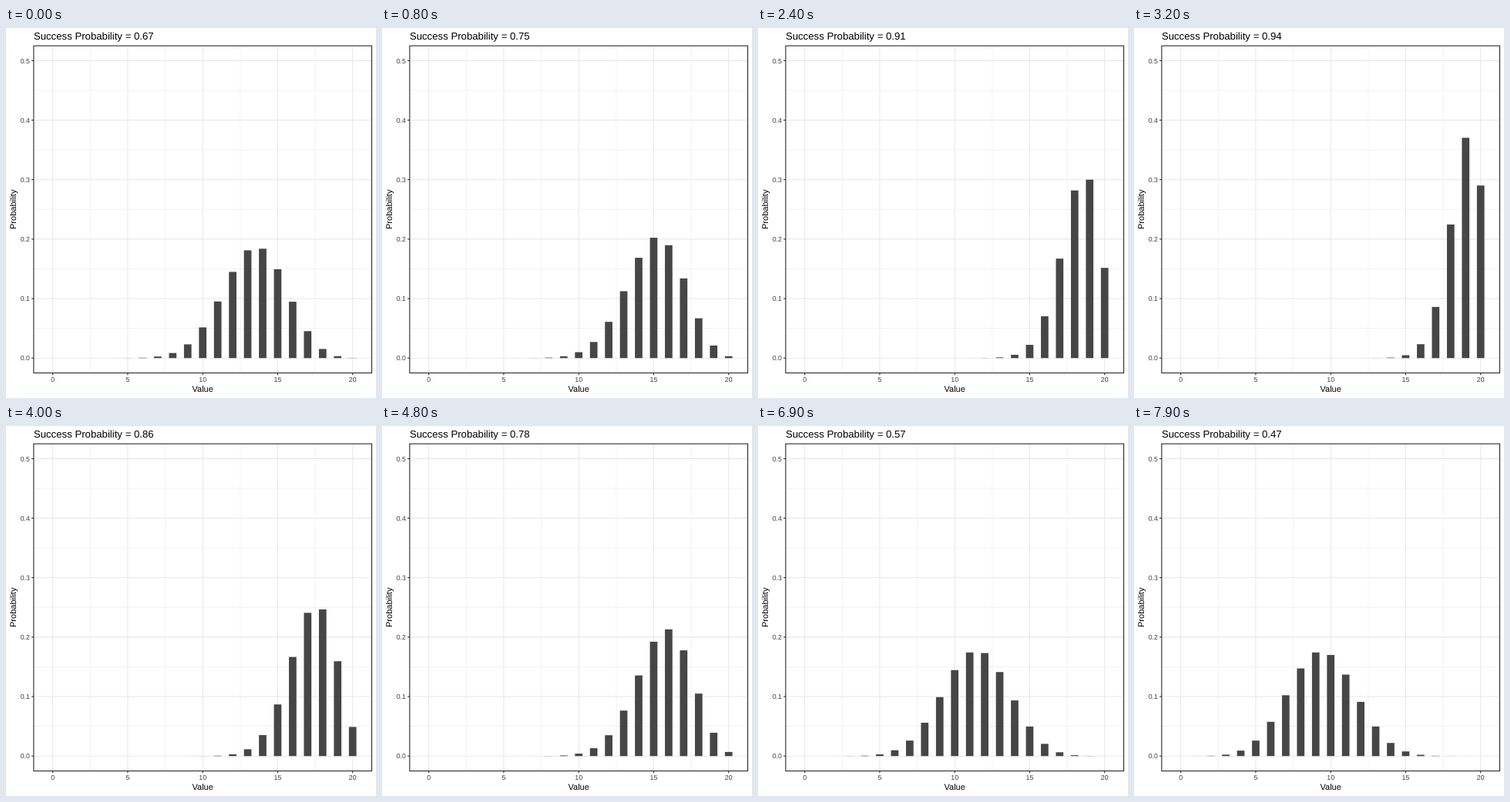
These frames come from a looping animation (480 px wide and 480 px high, 8 s). An HTML page:

```html
<!DOCTYPE html>
<html lang="en">
<head>
<meta charset="utf-8">
<title>Binomial distribution</title>
<style>
  html, body { margin: 0; width: 100%; height: 100%; overflow: hidden; background: #fff; }
  svg { display: block; width: 480px; height: 480px; }
  text { font: 11px "Liberation Sans", Arial, sans-serif; text-rendering: geometricPrecision; }
  .title { font-size: 13.2px; }
  .label { font-size: 8.8px; fill: #3b3b3b; }
  .mid { text-anchor: middle; }
  .end { text-anchor: end; }
  .major { stroke: #e7e7e7; stroke-width: 1.07; }
  .minor { stroke: #e7e7e7; stroke-width: .53; }
  .tick { stroke: #242424; stroke-width: 1.07; }
  .bar { fill: #464646; }
  .border { fill: none; stroke: #242424; stroke-width: 1.07; }
</style>
</head>
<body>
<svg id="plot" viewBox="0 0 480 480"></svg>
<script>
const TRIALS = 20, STEP = 100, LOOP = 8000;
const panel = { left: 35.9, right: 474.5, top: 23.1, bottom: 447.5 };
const unitX = (panel.right - panel.left) / 22.55;
const unitY = (panel.bottom - panel.top) / 0.55;
const x = v => panel.left + (v + 1.275) * unitX;
const y = v => panel.bottom - (v + 0.025) * unitY;
const plot = document.getElementById('plot');

function add(tag, attrs, content = '') {
  const el = document.createElementNS('http://www.w3.org/2000/svg', tag);
  for (const key in attrs) el.setAttribute(key, attrs[key]);
  el.textContent = content;
  return plot.appendChild(el);
}
const line = (cls, x1, y1, x2, y2) => add('line', { class: cls, x1, y1, x2, y2 });
const vertical = (cls, v) => line(cls, x(v), panel.top, x(v), panel.bottom);
const horizontal = (cls, v) => line(cls, panel.left, y(v), panel.right, y(v));

// Grid
for (let i = 0; i < 5; i++) horizontal('minor', i / 10 + 0.05);
for (let i = 0; i < 4; i++) vertical('minor', i * 5 + 2.5);
for (let i = 0; i <= 5; i++) horizontal('major', i / 10);
for (let i = 0; i <= 4; i++) vertical('major', i * 5);

// Bars
const bars = Array.from({ length: TRIALS + 1 }, (_, k) =>
  add('rect', { class: 'bar', x: x(k - 0.25), width: unitX / 2 }));

// Frame and axes
add('rect', {
  class: 'border', x: panel.left, y: panel.top,
  width: panel.right - panel.left, height: panel.bottom - panel.top
});
for (let i = 0; i <= 5; i++) {
  const v = i / 10;
  line('tick', panel.left - 2.75, y(v), panel.left, y(v));
  add('text', { class: 'label end', x: panel.left - 4.95, y: y(v) + 3.15 }, v.toFixed(1));
}
for (let v = 0; v <= TRIALS; v += 5) {
  line('tick', x(v), panel.bottom, x(v), panel.bottom + 2.75);
  add('text', { class: 'label mid', x: x(v), y: 459 }, v);
}
const midX = (panel.left + panel.right) / 2, midY = (panel.top + panel.bottom) / 2;
add('text', { class: 'mid', x: midX, y: 472 }, 'Value');
add('text', { class: 'mid', transform: `translate(13.4 ${midY}) rotate(-90)` }, 'Probability');
const title = add('text', { class: 'title', x: panel.left, y: 15 });

function binomial(p) {
  const out = [(1 - p) ** TRIALS];
  for (let k = 1; k <= TRIALS; k++)
    out.push(out[k - 1] * (TRIALS - k + 1) / k * p / (1 - p));
  return out;
}

// Rises by 0.01 per step to 0.96, holds one step, then falls.
function probability(step) {
  return (step < 30 ? 67 + step : 126 - step) / 100;
}

let shown = -1;
function draw(now) {
  const step = Math.floor((now % LOOP) / STEP);
  if (step !== shown) {
    shown = step;
    const p = probability(step);
    title.textContent = 'Success Probability = ' + p.toFixed(2);
    binomial(p).forEach((v, k) => {
      bars[k].setAttribute('y', y(v));
      bars[k].setAttribute('height', v * unitY);
    });
  }
}

const start = performance.now();
function tick() {
  draw(performance.now() - start);
  requestAnimationFrame(tick);
}
tick();
</script>
</body>
</html>
```
